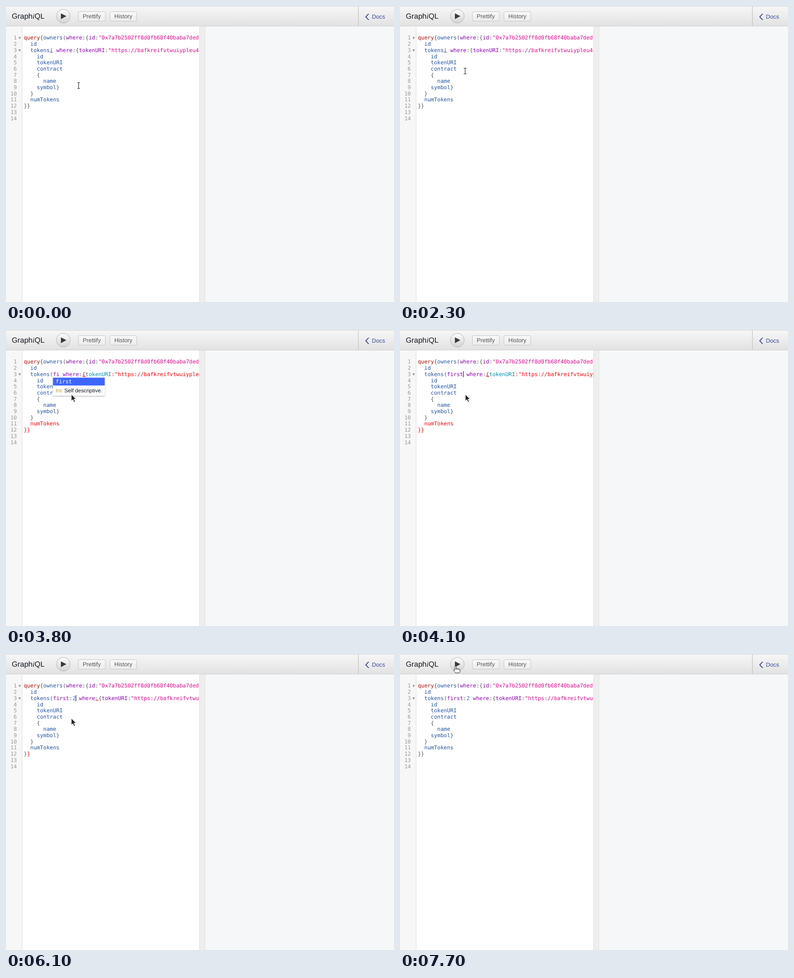
Write an HTML page that moves like this. It is 855 px wide and 655 px high and loops after 8 s.

```html
<!DOCTYPE html>
<html lang="en">
<head>
<meta charset="utf-8">
<title>GraphiQL</title>
<style>
html, body { margin: 0; width: 100%; height: 100%; overflow: hidden; background: #fff; }
svg { display: block; width: 855px; height: 655px; }
text { white-space: pre; text-rendering: geometricPrecision; font-family: "Liberation Sans", Arial, sans-serif; }
.code text, .mono { font: 11.87px "DejaVu Sans Mono", monospace; }
.num { fill: #999; text-anchor: end; }
.btn { font-size: 12.8px; fill: #555; }
.hint { font-size: 11.87px; fill: #141823; }
.k { fill: #b50a00; }
.u { fill: #555; }
.p { fill: #2354a3; }
.a { fill: #9000b8; }
.s { fill: #e6078c; }
.n { fill: #3c63ee; }
.e { fill: #f00; }
.q { fill: #008fae; }
.v { fill: #1873c8; }
</style>
</head>
<body>
<svg viewBox="0 0 855 655">
  <defs>
    <linearGradient id="bar" x2="0" y2="1"><stop stop-color="#f7f7f7"/><stop offset="1" stop-color="#e2e2e2"/></linearGradient>
    <linearGradient id="face" x2="0" y2="1"><stop stop-color="#f9f9f9"/><stop offset="1" stop-color="#ececec"/></linearGradient>
    <linearGradient id="round" x2="0" y2="1"><stop stop-color="#fdfdfd"/><stop offset="1" stop-color="#d2d3d6"/></linearGradient>
    <clipPath id="pane"><path d="M0 45H426.3V655H0z"/></clipPath>
    <filter id="shade" x="-10%" y="-20%" width="120%" height="150%"><feDropShadow dx="0" dy="1" stdDeviation="1.3" flood-opacity=".45"/></filter>
  </defs>

  <rect width="855" height="655" fill="#fff"/>
  <rect y="45" width="35" height="610" fill="#f7f7f7"/>
  <rect x="35" y="45" width="1" height="610" fill="#ddd"/>
  <rect x="427" y="45" width="12" height="610" fill="#eee"/>
  <rect x="439" y="45" width="416" height="610" fill="#f6f7f9"/>
  <path d="M426.5 45V655M438.5 45V655" stroke="#e0e0e0"/>

  <rect width="855" height="44" fill="url(#bar)"/>
  <path d="M0 .5H855M0 44.5H855" stroke="#d0d0d0"/>
  <path d="M776.5 1V44" stroke="#b9b9b9"/>
  <text x="12.8" y="28" font-size="16.44" fill="#141823">Graph<tspan font-family="Liberation Serif, serif" font-style="italic">i</tspan>QL</text>
  <circle cx="126.3" cy="22.6" r="15.2" fill="url(#round)" stroke="#b2b2b2"/>
  <path d="M121 16.2L133 22.6L121 29z" fill="#3a3a3a"/>
  <g fill="url(#face)" stroke="#c4c4c4">
    <rect x="159.5" y="12.5" width="59.5" height="21" rx="2.5"/>
    <rect x="229" y="12.5" width="59" height="21" rx="2.5"/>
  </g>
  <text class="btn" x="169" y="27">Prettify</text>
  <text class="btn" x="238.7" y="27">History</text>
  <path d="M799.2 17.2L792.8 24L799.2 30.8" fill="none" stroke="#3b4b98" stroke-width="1.9"/>
  <text x="806.2" y="28.3" font-size="12.8" fill="#3b4b98">Docs</text>

  <g id="code" class="code" clip-path="url(#pane)"></g>
  <path id="match" d="M96.4 102.2h7.15" stroke="#555"/>
  <path id="wave" d="M0 103l1.2-1.6l1.2 1.6l1.2-1.6l1.2 1.6l1.2-1.6l1.2 1.6" fill="none" stroke="#e00000" stroke-width=".9"/>
  <rect id="caret" y="91" width="1.1" height="13.4"/>

  <g id="popup">
    <rect x="103.5" y="105" width="114" height="40.5" fill="#fff" filter="url(#shade)"/>
    <rect x="103.5" y="105.5" width="114" height="17.3" fill="#3d66ff"/>
    <text class="mono" x="109.5" y="118" fill="#fff">first</text>
    <text class="hint" x="109.5" y="138.3" style="fill:#d4962a">Int</text>
    <text class="hint" x="128.5" y="138.3">Self descriptive.</text>
  </g>

  <g id="beam" fill="none">
    <path d="M-3 -6.5H-1L0 -5.5L1 -6.5H3M0 -5.5V5.5M-3 6.5H-1L0 5.5L1 6.5H3" stroke="#fff" stroke-width="2.4" opacity=".8"/>
    <path d="M-3 -6.5H-1L0 -5.5L1 -6.5H3M0 -5.5V5.5M-3 6.5H-1L0 5.5L1 6.5H3" stroke="#222" stroke-width="1.1"/>
  </g>
  <path id="arrow" d="M0 0V14.5L3.4 11.4L6 17.3L8.4 16.2L5.8 10.5H10.4z" fill="#222" stroke="#fff" stroke-width=".9"/>
  <g id="hand" stroke="#222" stroke-linejoin="round" fill="#fff">
    <path d="M-1.4 1.2Q0 -.8 1.4 1.2V6.2Q3 5 4.2 6.6Q5.8 5.6 7 7.2Q9.6 6.6 10 9V12Q9.6 14 8.6 15.6H-.2Q-1.2 13.4 -3.6 10.8Q-4.8 8.8 -3.4 8.4Q-2.4 8.2 -1.4 9.8z"/>
    <path d="M1.4 6.2V9M4.2 6.8V9.2M7 7.4V9.4" fill="none"/>
  </g>
</svg>
<script>
const NS = 'http://www.w3.org/2000/svg';
const LOOP = 8000, LEFT = 39.2, CHAR = 7.15, ROW = 13.7, BASE = 74.4;
const $ = id => document.getElementById(id);
const colX = col => LEFT + col * CHAR;

function add(parent, tag, attrs, text) {
  const el = document.createElementNS(NS, tag);
  for (const key in attrs) el.setAttribute(key, attrs[key]);
  if (text) el.textContent = text;
  return parent.appendChild(el);
}

// Tokens are separated by "~"; the first letter of each is its colour class.
function addLine(parent, row, indent, tokens) {
  let col = indent;
  for (const token of tokens.split('~')) {
    const word = token.slice(1);
    add(parent, 'text', { class: token[0], x: colX(col), y: BASE + (row - 1) * ROW }, word);
    col += word.length;
  }
}

const code = $('code');
const group = () => add(code, 'g', {});

for (let row = 1; row <= 14; row++)
  add(code, 'text', { class: 'num', x: 24, y: BASE + (row - 1) * ROW }, String(row));
const fold = row => add(code, 'path', { d: `M27.5 ${68.7 + (row - 1) * ROW}h5.4l-2.7 4.8z`, fill: '#909090' });
const topFold = fold(1);
fold(3);

const body = [
  [1, 0, 'kquery~u{~powners~u(~awhere~u:{~aid~u:~s"0x7a7b2502ff8d0fb68f40baba7ded'],
  [2, 2, 'pid'],
  [4, 4, 'pid'], [5, 4, 'ptokenURI'], [6, 4, 'pcontract'], [7, 4, 'u{'],
  [8, 6, 'pname'], [9, 4, 'psymbol~u}'], [10, 2, 'u}']
];
for (const line of body) addLine(code, ...line);

const url = '"https://bafkreifvtwuiypleu4';
const valid = '~awhere~u:{~atokenURI~u:~s' + url;
const broken = '~awhere~u:~e{~qtokenURI~e:' + url;
const args = {
  empty: 'u ' + valid,
  f: 'af ' + broken,
  fi: 'afi ' + broken,
  first: 'afirst ' + broken,
  colon: 'afirst~u: ~vwhere~e:~u{~ptokenURI~u:~e' + url,
  two: 'afirst~u:~n2 ' + valid
};
const tails = {
  ok: ['pnumTokens', 'u}}'],
  bad: ['enumTokens', 'e}}'],
  half: ['pnumTokens', 'u}~e}']
};
const argViews = {}, tailViews = {};
for (const key in args) addLine(argViews[key] = group(), 3, 2, 'ptokens~u(~' + args[key]);
for (const key in tails) {
  const g = tailViews[key] = group();
  addLine(g, 11, 2, tails[key][0]);
  addLine(g, 12, 0, tails[key][1]);
}

// Each track lists [start time, value...]; a value holds until the next one.
const tracks = {
  arg: [[0, 'empty'], [2700, 'f'], [3200, 'fi'], [4000, 'first'], [4900, 'colon'], [6100, 'two']],
  tail: [[0, 'ok'], [3200, 'bad'], [5300, 'half'], [6400, 'ok']],
  caret: [[0, 0], [500, 9], [1000, 0], [1700, 9], [2300, 0], [2700, 10], [3200, 11], [3700, 0],
    [4000, 14], [4900, 15], [5400, 0], [6100, 16], [6600, 0], [7300, 16], [7700, 0]],
  wave: [[0, 0], [3700, 18], [4000, 21], [4900, 22], [5400, 21], [6100, 22], [6400, 0]],
  fold: [[0, 1], [3800, 0], [5400, 1]],
  popup: [[0, 0], [2900, 1], [4000, 0]],
  pointer: [
    [0, 'beam', 160, 176], [100, 'beam', 133, 128.5], [300, 'beam', 112.5, 103],
    [500, 'beam', 108, 96], [600, 'beam', 107, 95], [1000, 'beam', 106, 95],
    [1700, 'beam', 114, 104], [1800, 'beam', 131, 129], [1900, 'beam', 143.5, 144],
    [2900, 'arrow', 144, 142.5], [4200, 'beam', 143.5, 144], [4900, 'arrow', 144, 142.5],
    [6200, 'beam', 143.5, 144], [6400, 'beam', 142, 138], [6500, 'beam', 138, 122],
    [6600, 'beam', 134, 106], [6700, 'beam', 133, 99], [6800, 'beam', 132.5, 97],
    [6900, 'beam', 132, 86], [7000, 'beam', 130, 68], [7100, 'beam', 127, 50],
    [7200, 'hand', 125, 34], [7300, 'hand', 124, 31], [7400, 'hand', 123, 29],
    [7500, 'hand', 122.5, 27.5], [7600, 'hand', 122, 27], [7700, 'hand', 122.3, 26.2]
  ]
};

const at = (name, t) => tracks[name].findLast(step => step[0] <= t).slice(1);
const show = (el, on) => { el.style.display = on ? '' : 'none'; };
const pick = (views, key) => { for (const k in views) show(views[k], k === key); };
const pointers = { beam: $('beam'), arrow: $('arrow'), hand: $('hand') };

function draw(now) {
  const t = now % LOOP;
  const [arg] = at('arg', t), [caret] = at('caret', t), [wave] = at('wave', t);
  pick(argViews, arg);
  pick(tailViews, at('tail', t)[0]);
  show($('match'), arg === 'empty');
  show($('caret'), caret);
  $('caret').setAttribute('x', colX(caret));
  show($('wave'), wave);
  $('wave').setAttribute('transform', `translate(${colX(wave)})`);
  show(topFold, at('fold', t)[0]);
  show($('popup'), at('popup', t)[0]);
  const [kind, x, y] = at('pointer', t);
  pick(pointers, kind);
  pointers[kind].setAttribute('transform', `translate(${x} ${y})`);
}

const start = performance.now();
function tick() {
  draw(performance.now() - start);
  requestAnimationFrame(tick);
}
tick();
</script>
</body>
</html>
```
